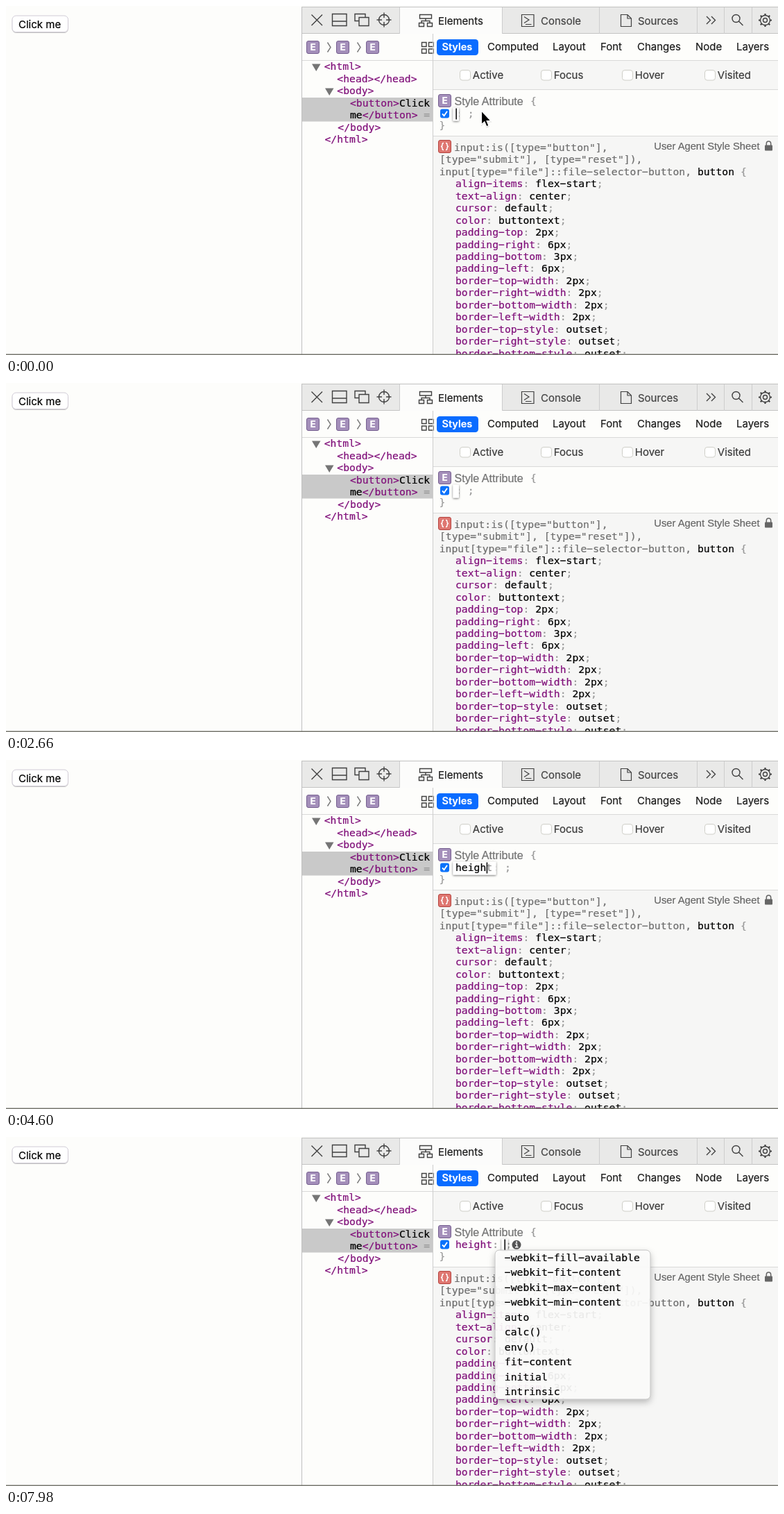
An HTML page that plays this animation: 1113 px wide and 503 px high, repeating every 8 s.

```html
<!DOCTYPE html>
<html lang="en">
<head>
<meta charset="utf-8">
<title>Style editor</title>
<style>
html, body { margin: 0; width: 100%; height: 100%; overflow: hidden; background: #fdfdfb; }
svg { display: block; width: 100%; height: 100%; }
text { white-space: pre; stroke-width: .22px; }
text, tspan { fill: currentColor; stroke: currentColor; }
.mono { font: 14.72px "DejaVu Sans Mono", monospace; color: #000; }
.ui { font: 15px Inter, sans-serif; color: #1c1c1c; }
.sans { font-family: "Liberation Sans", sans-serif; color: #747474; }
.tag { color: #80107a; }
.dim { color: #999; }
.gray { color: #6f6f6f; }
.ghost { color: #888; }
.icon { fill: none; stroke: #404040; stroke-width: 1.4; }
.line { fill: none; stroke: #cdcdcd; stroke-width: 1; }
</style>
</head>
<body>
<svg id="stage" viewBox="0 0 1113 503" preserveAspectRatio="none"></svg>
<script>
const ADV = 8.86, FIELD_X = 648, LOOP = 8000;
const WORD = "height";
const KEYS = [2740, 2920, 3450, 3950, 4450, 4720];
const HIDE_POINTER = 2640, OPEN_LIST = 7400;

// the wide dash suits this code font
const esc = s => s.replace(/&/g, "&amp;").replace(/</g, "&lt;").replace(/-/g, "\u2212");
const span = (s, cls) => `<tspan class="${cls}">${esc(s)}</tspan>`;
// parts: text and class in turn
const mono = (x, y, ...parts) => {
  let out = "";
  for (let i = 0; i < parts.length; i += 2) out += span(parts[i], parts[i + 1] || "");
  return `<text class="mono" x="${x}" y="${y}">${out}</text>`;
};
const ui = (x, y, s, style = "") => `<text class="ui" x="${x}" y="${y}" style="${style}">${s}</text>`;
const rect = (x, y, w, h, fill, extra = "") =>
  `<rect x="${x}" y="${y}" width="${w}" height="${h}" fill="${fill}" ${extra}/>`;
const path = (d, cls = "icon", extra = "") => `<path class="${cls}" d="${d}" ${extra}/>`;

const badge = (x, y) =>
  rect(x + .5, y + .5, 18, 18, "#a48fba", 'rx="2.5" stroke="#765f90"') +
  ui(x + 9.5, y + 14.4, "E", "color:#fff;font-size:13.5px;font-weight:700;text-anchor:middle");

function page() {
  return rect(0, 0, 1113, 503, "#fdfdfb") +
    rect(9, 14, 80.5, 23.5, "#fff", 'rx="5.5" stroke="#d0cbd6" filter="url(#soft)"') +
    ui(18, 32, "Click me", "color:#000");
}

function toolbar() {
  const teeth = Array.from({ length: 8 }, (_, i) => {
    const a = i * Math.PI / 4, c = Math.cos(a), s = Math.sin(a);
    return `M${1094.5 + c * 7} ${20.5 + s * 7}L${1094.5 + c * 9.5} ${20.5 + s * 9.5}`;
  }).join("");
  return rect(426, 2, 687, 38, "#e9e9e8") +
    rect(568, 2, 147, 38, "#fcfcfb") +
    path("M426 1.5H1113M426 39.5H568M715 39.5H1113", "line", 'style="stroke:#c3c3c3"') +
    path("M567.5 2V40M715.5 2V40M855.5 2V40M996.5 2V40M1035.5 2V40M1075.5 2V40", "line") +
    path("M440.5 12.5L456 28M456 12.5L440.5 28") +
    path("M470.5 11.5H491V28.5H470.5ZM470.5 22H491") +
    path("M509 21.5H503V11.5H518V16.5M509 16.5H523V28.5H509Z") +
    path("M537.5 20a7.5 7.5 0 1 0 15 0a7.5 7.5 0 1 0 -15 0M545 9.5V17M545 23V30.5M534.5 20H542M548 20H555.5") +
    path("M596.5 12.5H613.5V18H596.5ZM605 18V21.5M595.5 24.5H602.5V29.5H595.5ZM607.5 24.5H614.5V29.5H607.5ZM599 24.5V21.5H611V24.5") +
    ui(623, 27, "Elements") +
    path("M743.5 12.5H761V29.5H743.5ZM747 15.5L754 20L747 24.5M749 26.5H757.5", "icon", 'style="stroke-width:1.2"') +
    ui(771, 27, "Console", "color:#444") +
    path("M886.5 12.5H896L901.5 18V29.5H886.5ZM896 12.5V18H901.5", "icon", 'style="stroke-width:1.2"') +
    ui(911, 27, "Sources", "color:#444") +
    path("M1010 15L1015.5 20.5L1010 26M1017 15L1022.5 20.5L1017 26") +
    path("M1047 18a5.5 5.5 0 1 0 11 0a5.5 5.5 0 1 0 -11 0M1056.5 22L1062.5 28") +
    path("M1087.5 20.5a7 7 0 1 0 14 0a7 7 0 1 0 -14 0M1091.5 20.5a3 3 0 1 0 6 0a3 3 0 1 0 -6 0") +
    path(teeth, "icon", 'style="stroke-width:2.2"');
}

function tree() {
  const row = i => 92.3 + i * 17.46;
  return badge(433, 50) + badge(476, 50) + badge(519, 50) +
    path("M463.5 52.5L468 59.5L463.5 66.5M506.5 52.5L511 59.5L506.5 66.5", "icon", 'style="stroke:#777"') +
    path("M599.5 52.5H606V58.5H599.5ZM609.5 52.5H616V58.5H609.5ZM599.5 62H606V68H599.5ZM609.5 62H616V68H609.5Z") +
    rect(427, 132, 188, 34.5, "#c9c9c9") +
    path("M441 83.5H453.5L447.2 94ZM460 118.5H472.5L466.2 129Z", "", 'fill="#757575"') +
    mono(458.7, row(0), "<html>", "tag") +
    mono(477.3, row(1), "<head></head>", "tag") +
    mono(477.3, row(2), "<body>", "tag") +
    mono(496, row(3), "<button>", "tag", "Click", "") +
    `<g clip-path="url(#left)">${mono(496, row(4), "me", "", "</button>", "tag", " = ", "dim")}</g>` +
    mono(478.3, row(5), "</body>", "tag") +
    mono(459.5, row(6), "</html>", "tag");
}

function tabs() {
  const names = [[694, "Computed"], [788, "Layout"], [857, "Font"], [910, "Changes"], [994, "Node"], [1053, "Layers"]];
  const states = [[654, "Active"], [771, "Focus"], [888, "Hover"], [1007, "Visited"]];
  return rect(616, 79, 497, 41, "#f6f6f5") +
    rect(621, 48, 60, 23, "#0a6cff", 'rx="4.5"') +
    ui(628.5, 64, "Styles", "color:#fff;font-size:14.5px;font-weight:600") +
    names.map(([x, s]) => ui(x, 64, s)).join("") +
    states.map(([x, s]) =>
      rect(x + .5, 92.5, 15, 14.5, "#fff", 'rx="3.5" stroke="#cfcfc8"') +
      ui(x + 18.8, 105, s, "color:#3c3c3c")).join("") +
    path("M427 78.5H1113M616 120.5H1113", "line", 'style="stroke:#d9d9d9"');
}

function rules() {
  const sides = ["top", "right", "bottom", "left"];
  const props = [
    ["align-items", "flex-start"], ["text-align", "center"], ["cursor", "default"], ["color", "buttontext"],
    ...sides.map(s => ["padding-" + s, { top: "2px", bottom: "3px" }[s] || "6px"]),
    ...sides.map(s => [`border-${s}-width`, "2px"]),
    ...sides.slice(0, 3).map(s => [`border-${s}-style`, "outset"])
  ];
  return badge(623, 127) +
    `<text class="sans" x="646.5" y="142.5" font-size="16.1">Style Attribute</text>` +
    mono(756, 141.6, "{", "dim") + mono(624.5, 176.6, "}", "dim") +
    rect(626, 148.5, 13, 13, "#0a72fb", 'rx="3"') +
    path("M629 155.3L631.6 158.2L636 151.8", "icon", 'style="stroke:#fff;stroke-width:1.9"') +
    rect(616, 187, 497, 316, "#f6f6f5") +
    path("M616 187.5H1113", "line", 'style="stroke:#d9d9d9"') +
    rect(623.5, 193.5, 18, 18, "#df7771", 'rx="2.5" stroke="#b5443f"') +
    path("M631 197.5Q629 197.5 629 200Q629 202.5 627 202.5Q629 202.5 629 205Q629 207.5 631 207.5M634 197.5Q636 197.5 636 200Q636 202.5 638 202.5Q636 202.5 636 205Q636 207.5 634 207.5", "icon", 'style="stroke:#fff"') +
    `<text class="sans" x="934.3" y="206.7" font-size="14.72" style="color:#666">User Agent Style Sheet</text>` +
    rect(1094, 200.5, 11, 8, "#666", 'rx="1"') +
    path("M1096.3 201V198.3a3.2 3.2 0 0 1 6.4 0V201", "icon", 'style="stroke:#666;stroke-width:1.5"') +
    mono(646, 208.8, 'input:is([type="button"],', "gray") +
    mono(625, 226.2, '[type="submit"], [type="reset"]),', "gray") +
    mono(624.7, 243.6, 'input[type="file"]::file-selector-button, ', "gray", "button", "", " {", "dim") +
    props.map(([k, v], i) =>
      mono(FIELD_X, 261.2 + i * 17.46, k, "tag", ": ", "dim", v, "", ";", "dim")).join("");
}

function frameLines() {
  return path("M426.5 2V503", "line", 'style="stroke:#c0c0c0"') +
    path("M615.5 40V503", "line") +
    rect(0, 501.5, 1113, 1.5, "#77776f");
}

const EDIT_Y = 159.5;
const field = (x, w, h) => rect(x, 146.5, w, h, "#fff", 'rx="1" filter="url(#lift)"');
const caret = x => rect(x, 147.5, 1.5, 16, "#000");

function nameEditor(t) {
  const n = KEYS.filter(k => t >= k).length;
  const len = n ? WORD.length : 0;
  const phase = n ? t - KEYS[n - 1] : t + 250;
  return mono(FIELD_X + len * ADV, EDIT_Y, ": ;", "dim") +
    field(644.5, len ? 62 : 8.5, 19) +
    (n ? mono(FIELD_X, EDIT_Y, WORD.slice(0, n), "", WORD.slice(n), "ghost") : "") +
    (phase % 1000 < 500 ? caret(FIELD_X + .4 + n * ADV) : "");
}

function valueEditor() {
  const px = "-webkit-";
  const items = [px + "fill-available", px + "fit-content", px + "max-content", px + "min-content",
    "auto", "calc()", "env()", "fit-content", "initial", "intrinsic"];
  return mono(FIELD_X, EDIT_Y, WORD, "tag", ":", "dim") +
    mono(720, EDIT_Y, ";", "dim") +
    field(714.5, 9, 17) + caret(718.5) +
    `<circle cx="736" cy="155.3" r="6.5" fill="#555"/>` +
    path("M734.3 154.2H736.5V158.6M734 158.8H738.6", "icon", 'style="stroke:#fff"') +
    rect(735.1, 150.5, 2, 2, "#fff") +
    rect(705, 163, 224, 215, "#fdfdfc", 'rx="6" fill-opacity=".91" stroke="#b5b5b5" stroke-width=".8" filter="url(#drop)"') +
    items.map((s, i) => mono(718.8, 178.5 + i * 21.5, s, "")).join("");
}

const pointer = path("M685.5 151V170.8L689.9 166.8L692.8 173.8L696 172.4L693.1 165.6H699Z", "",
  'fill="#000" stroke="#fff" stroke-width="1.2" filter="url(#soft)"');

const defs = `<defs>
  <clipPath id="left"><rect x="427" y="40" width="188" height="463"/></clipPath>
  <filter id="soft" x="-20%" y="-20%" width="140%" height="160%"><feDropShadow dx="0" dy="1" stdDeviation=".7" flood-opacity=".22"/></filter>
  <filter id="lift" x="-60%" y="-40%" width="220%" height="200%"><feDropShadow dx="0" dy="1" stdDeviation="1.4" flood-opacity=".6"/></filter>
  <filter id="drop" x="-10%" y="-10%" width="120%" height="125%"><feDropShadow dx="0" dy="4" stdDeviation="5" flood-opacity=".28"/></filter>
</defs>`;

const stage = document.getElementById("stage");
stage.innerHTML = defs + page() + toolbar() + tabs() + tree() + rules() + '<g id="live"></g>' + frameLines();
const live = document.getElementById("live");

let shown = "";
function draw(t) {
  const next = (t < OPEN_LIST ? nameEditor(t) : valueEditor()) + (t < HIDE_POINTER ? pointer : "");
  if (next !== shown) live.innerHTML = shown = next;
}

const start = performance.now();
function tick(now) {
  draw(Math.max(0, now - start) % LOOP);
  requestAnimationFrame(tick);
}
draw(0);
requestAnimationFrame(tick);
</script>
</body>
</html>
```
